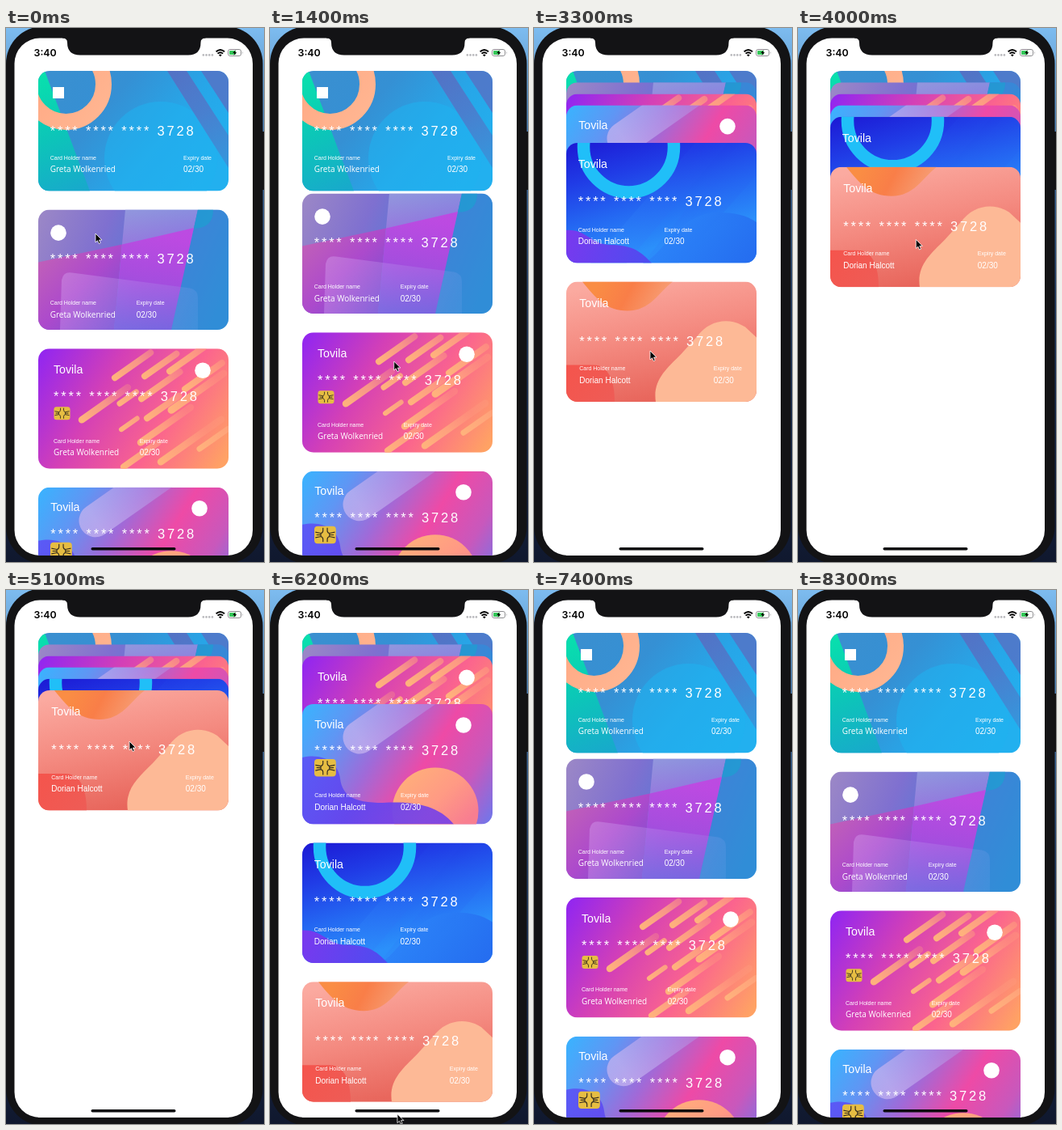
An HTML page for the animation above (8.4 s loop, 320x660 px).

```html
<!DOCTYPE html>
<html lang="en">
<head>
<meta charset="utf-8">
<title>Card stack</title>
<style>
  html, body { margin: 0; width: 100%; height: 100%; overflow: hidden; background: #131315; }
  svg { display: block; width: 100vw; height: 100vh; }
  text { font-family: "Liberation Sans", Arial, sans-serif; fill: #fff; white-space: pre; }
  .brand { font-size: 14.2px; }
  .digits { font-size: 16.5px; letter-spacing: 2.8px; }
  .label { font-size: 7px; }
  .value { font-size: 10px; }
  .wide { font-family: "Open Sans", sans-serif; }
  .clock { font: 600 12.4px Inter, sans-serif; fill: #000; }
</style>
</head>
<body>
<svg id="stage" viewBox="0 0 320 660" preserveAspectRatio="none"></svg>
<script>
const LOOP = 8400, STEP = 100;
const TOP = 53, PITCH = 171.6, PEEK = 14.2, W = 236, H = 148.5;

const grad = (id, x1, y1, x2, y2, ...stops) =>
  `<linearGradient id="${id}" gradientUnits="userSpaceOnUse" x1="${x1}" y1="${y1}" x2="${x2}" y2="${y2}">` +
  stops.map((s, i) => {
    const [color, alpha = 1] = s.split(' ');
    return `<stop offset="${i / (stops.length - 1)}" stop-color="${color}" stop-opacity="${alpha}"/>`;
  }).join('') + '</linearGradient>';
const path = (d, fill, alpha = 1) => `<path d="${d}" fill="${fill}" fill-opacity="${alpha}"/>`;
const disc = (x, y, r, fill, alpha = 1) => `<circle cx="${x}" cy="${y}" r="${r}" fill="${fill}" fill-opacity="${alpha}"/>`;
const ring = (x, y, r, w, color) => `<circle cx="${x}" cy="${y}" r="${r}" fill="none" stroke="${color}" stroke-width="${w}"/>`;
const base = fill => path(`M0 0H${W}V${H}H0Z`, fill);
const text = (x, y, cls, str) => `<text x="${x}" y="${y}" class="${cls}">${str}</text>`;
const stripe = (x, y, len, w, fill) =>
  `<rect x="${-w / 2}" y="${-w / 2}" width="${len}" height="${w}" rx="${w / 2}" fill="${fill}" transform="translate(${x} ${y}) rotate(-35)"/>`;

const chip = (x, y, k) => `<g transform="translate(${x} ${y}) scale(${k})">
  <rect width="20" height="16" rx="3" fill="#e6bd42"/>
  <path d="M8 1.500V4Q8 6 6 6.500V9.500Q8 10 8 12V14.500M12 1.500V4Q12 6 14 6.500V9.500Q12 10 12 12V14.500M1 5.500L6 6.500M1 10.500L6 9.500M19 5.500L14 6.500M19 10.500L14 9.500M2 8H6M14 8H18"
    fill="none" stroke="#3a3020" stroke-width=".9"/></g>`;

const defs = [
  grad('sky', 0, 0, 0, 660, '#7dbcf0', '#3f6d9f', '#243f66', '#17294a', '#10182e'),
  grad('a', 20, 0, 200, 148, '#3a8fd0', '#3590d4', '#27a6e8', '#22b0ef'),
  grad('aTeal', 0, 0, 60, 148, '#08e2ac', '#0cc6b8', '#18a8cc'),
  grad('aBand', 160, 0, 236, 110, '#5a6ac0', '#4f78ca', '#3a90d8'),
  grad('aRing', 0, 0, 80, 70, '#ffa883', '#ffb793'),
  grad('b', 0, 0, 236, 100, '#9c88c6', '#7f70d0', '#4a7cd8', '#2f90d8'),
  grad('bLeft', 0, 60, 90, 148, '#c160b8', '#ac4acc', '#7450d2'),
  grad('bMid', 110, 0, 140, 148, '#98a0e0', '#a55fe0', '#6c52dc'),
  grad('bPink', 150, 30, 120, 148, '#c442e2', '#a84ade', '#6a58dc'),
  grad('bPanel', 30, 80, 200, 148, '#d8a8f4 .38', '#c0a0f0 .24', '#7fa8f0 .16'),
  grad('c', 0, 15, 225, 148, '#9427ee', '#d440b6', '#fb648e', '#ffa264'),
  grad('cBar', 0, 0, 70, 0, '#ffb27c', '#ffaa7e .8', '#ff9f80 .3'),
  grad('d', 0, 0, 236, 150, '#38b4ff', '#5f96f4', '#a06ad8', '#ee4aa6', '#c858bc', '#6a78ee'),
  grad('dPill', 0, 0, 140, 0, '#c9b6f0 .7', '#b9a4ec .5', '#a48de8 .3'),
  grad('dSun', 140, 85, 200, 148, '#ffab7c', '#ff9a84', '#f87e90'),
  grad('dWave', 0, 60, 150, 148, '#5a58f6', '#6146ee', '#7c44e4'),
  grad('e', 0, 0, 40, 148, '#1c18d4', '#203ce6', '#2468f2', '#2b90fa'),
  grad('eBand', 150, 0, 80, 148, '#2450ee .1', '#2e8cfa .55'),
  grad('eWave', 150, 80, 236, 148, '#2b82f8', '#2468ee'),
  grad('eViolet', 0, 105, 110, 148, '#7a38ee', '#4a4ef0'),
  grad('f', 60, 0, 90, 148, '#fbaaa0', '#f48a80', '#e8665c'),
  grad('fSun', 40, 0, 110, 36, '#fa8d44', '#f97e48', '#f79a70'),
  grad('fRed', 0, 100, 60, 148, '#f5544c', '#ee5c56'),
  `<clipPath id="card"><rect width="${W}" height="${H}" rx="14"/></clipPath>`,
  `<clipPath id="screen"><rect x="10.5" y="12.5" width="295.5" height="639.5" rx="31.5"/></clipPath>`
].join('');

// x, y, length, width of each bar
const bars = [
  [95, 36, 62, 8], [132, 34, 56, 8], [163, 28, 60, 8], [54, 88, 78, 8.5], [101, 68, 32, 7],
  [128, 62, 66, 8], [182, 50, 64, 8], [135, 86, 56, 8], [165, 76, 88, 9], [103, 100, 30, 6],
  [127, 116, 84, 8.5], [106, 146, 60, 8], [152, 140, 100, 8.5], [200, 124, 50, 7]
];

const art = [
  base('url(#a)') + disc(152, 108, 70, '#1fb2f0', .55) +
    path('M160 0H184L236 80V120Z', 'url(#aBand)', .85) + path('M202 0H236V52Z', '#5a6cc2', .75) +
    path('M0 0H8L64 148.5H0Z', 'url(#aTeal)') + ring(34.5, 16.5, 46.5, 20, 'url(#aRing)') +
    `<rect x="18" y="20" width="14" height="14" fill="#fff"/>`,
  base('url(#b)') + path('M0 65L104 43L94 148.5H0Z', 'url(#bLeft)') +
    path('M108 0H198L165 148.5H94Z', 'url(#bMid)', .8) +
    path('M104 43L193 22.500L165 148.5H94Z', 'url(#bPink)', .85) +
    path('M193 22.500L165 148.5H236V0H198Z', '#3289d6', .45) +
    path('M198 0H217C217 14 210 23 193 23Z', '#1e9ed2', .75) +
    path('M27 148.5L29 87Q31 76 42 78L188 97Q198 99 198 109V148.5Z', 'url(#bPanel)') +
    disc(25, 28.5, 9.8, '#fff'),
  base('url(#c)') + bars.map(b => stripe(...b, 'url(#cBar)')).join('') +
    disc(204, 27, 9.8, '#fff') + chip(19.5, 72, 1),
  base('url(#d)') + stripe(71, 41, 150, 41, 'url(#dPill)') +
    disc(165, 132, 53.5, 'url(#dSun)') +
    path('M0 66C28 60 45 74 47 92C50 118 72 122 100 122C136 120 168 124 188 148.5H0Z', 'url(#dWave)', .95) +
    disc(200, 26, 9.8, '#fff') + chip(15, 68, 1.34),
  base('url(#e)') + path('M160 0H200L75 148.5H30Z', 'url(#eBand)') + path('M236 0V40L140 148.5H95L215 0Z', 'url(#eBand)', .7) +
    path('M95 148.5C120 140 138 86 190 86C212 86 226 91 236 98V148.5Z', 'url(#eWave)', .9) +
    path('M0 108C24 106 32 126 54 126C84 126 94 136 106 148.5H0Z', 'url(#eViolet)') +
    ring(77.5, 5, 56, 15.5, '#20bff8'),
  base('url(#f)') + path('M20 0C36 20 50 36 76 36C104 36 114 14 132 0Z', 'url(#fSun)') +
    path('M0 103H34C52 103 60 122 60 148.5H0Z', 'url(#fRed)') +
    path('M111 148.5C107 122 124 108 142 90L162 68C178 46 204 44 222 56L236 69V148.5Z', '#fdb996')
];

const LONG = 'Greta Wolkenried', SHORT = 'Dorian Halcott';
// x, brand baseline, digits baseline, label baseline, value baseline, expiry x, holder
const info = [
  [14.7, 0, 80, 110.4, 125.4, 180, LONG],
  [14.7, 0, 66.2, 117.8, 133, 121.7, LONG],
  [19, 31, 65, 116.4, 131.6, 125.8, LONG],
  [15.2, 29.6, 63, 115.3, 130.6, 122, SHORT],
  [14.7, 31.4, 78.4, 109.6, 125, 121.5, SHORT],
  [16.2, 31, 79, 109.6, 125.4, 182.8, SHORT]
];
const caption = ([x, brand, digits, label, value, expiry, holder]) =>
  (brand ? text(x, brand, 'brand', 'Tovila') : '') +
  text(x, digits, 'digits', '**** **** **** 3728') +
  text(x, label, 'label', 'Card Holder name') +
  text(x, value, holder === LONG ? 'value wide' : 'value', holder) +
  text(expiry, label, 'label', 'Expiry date') +
  text(expiry, value, 'value', '02/30');

const status = text(34.5, 34.6, 'clock', '3:40') +
  [0, 1, 2, 3].map(i => disc(244.8 + i * 3.7, 33.4, 1.3, '#b9b9bd')).join('') +
  `<g fill="none" stroke="#000" stroke-width="1.9">
    <path d="M260.6 29.2Q265.8 24.6 271 29.2M262.5 31.6Q265.8 28.7 269.1 31.6"/></g>` +
  path('M263.9 33.2Q265.8 31.8 267.7 33.2L265.8 35.2Z', '#000') +
  `<rect x="275.5" y="26.5" width="16" height="8" rx="2.4" fill="#fff" stroke="#8d8d90"/>
   <rect x="277" y="28" width="8" height="5" rx="1" fill="#35c759"/>` +
  path('M293 29V32.2Q294.3 30.6 293 29Z', '#8d8d90') +
  path('M284.6 27.2L281.2 31H283.3L282.5 34L286.2 29.9H284Z', '#000');

const stage = document.getElementById('stage');
stage.innerHTML = `<defs>${defs}</defs>
  <rect width="320" height="660" fill="url(#sky)"/>
  <rect x="316" y="128" width="4" height="72" fill="#131315"/>
  <rect y="-2" width="318.5" height="664" rx="46" fill="#131315"/>
  <g clip-path="url(#screen)">
    <rect x="10" y="12" width="297" height="641" fill="#fff"/>
    ${art.map((a, i) => `<g class="card" clip-path="url(#card)">${a}${caption(info[i])}</g>`).join('')}
    ${status}
    <rect x="105.5" y="642" width="105" height="3.6" rx="1.8" fill="#0a0a0c"/>
  </g>
  ${path('M70 12V12.500Q76 12.500 76 18Q76 33.5 92 33.5H226Q241.500 33.5 241.500 18Q241.500 12.500 247.500 12.500V12Z', '#131315')}
  <path id="cursor" d="M0 0V11L2.5 8.700L4.300 12.600L6.200 11.700L4.500 8H8Z" fill="#000" stroke="#fff" stroke-width=".8"/>`;
const cards = [...stage.querySelectorAll('.card')];
const cursor = document.getElementById('cursor');

// Monotone cubic through [time, value] keys
function curve(keys) {
  const slope = keys.slice(1).map(([t, v], i) => (v - keys[i][1]) / (t - keys[i][0]));
  const tangent = keys.map((_, i) => {
    const a = slope[i - 1], b = slope[i];
    return a * b > 0 ? 2 * a * b / (a + b) : 0;
  });
  return t => {
    const n = keys.findIndex(k => k[0] > t);
    if (n < 0) return keys[keys.length - 1][1];
    if (n === 0) return keys[0][1];
    const [t0, v0] = keys[n - 1], [t1, v1] = keys[n], d = t1 - t0, u = (t - t0) / d;
    const w = u * u * (3 - 2 * u);
    return v0 + (v1 - v0) * w + d * u * (1 - u) * (tangent[n - 1] * (1 - u) - tangent[n] * u);
  };
}

const scroll = curve([[1200, 0], [1400, 20], [1700, 290], [2100, 446], [2700, 447],
  [3300, 597.4], [3900, 725], [4600, 800], [5100, 809], [5400, 809], [6100, 480], [6800, 115], [7300, 22], [7900, 0]]);
const mouseX = curve([[200, 111], [1300, 154], [2100, 147], [3300, 144], [5100, 153], [6300, 158]]);
const mouseY = curve([[200, 254], [1200, 432], [1400, 412], [1700, 215], [2100, 597], [2350, 597],
  [2700, 549], [3300, 399], [3900, 272], [5100, 187], [5400, 187], [6300, 664]]);

function draw(t) {
  const s = scroll(t);
  cards.forEach((c, i) => {
    const y = TOP + Math.max(i * PEEK, i * PITCH - s);
    c.setAttribute('transform', `translate(40 ${y.toFixed(2)})`);
  });
  cursor.setAttribute('transform', `translate(${mouseX(t).toFixed(2)} ${mouseY(t).toFixed(2)})`);
}

function tick() {
  draw(Math.floor(performance.now() % LOOP / STEP) * STEP);
  requestAnimationFrame(tick);
}
tick();
</script>
</body>
</html>
```
